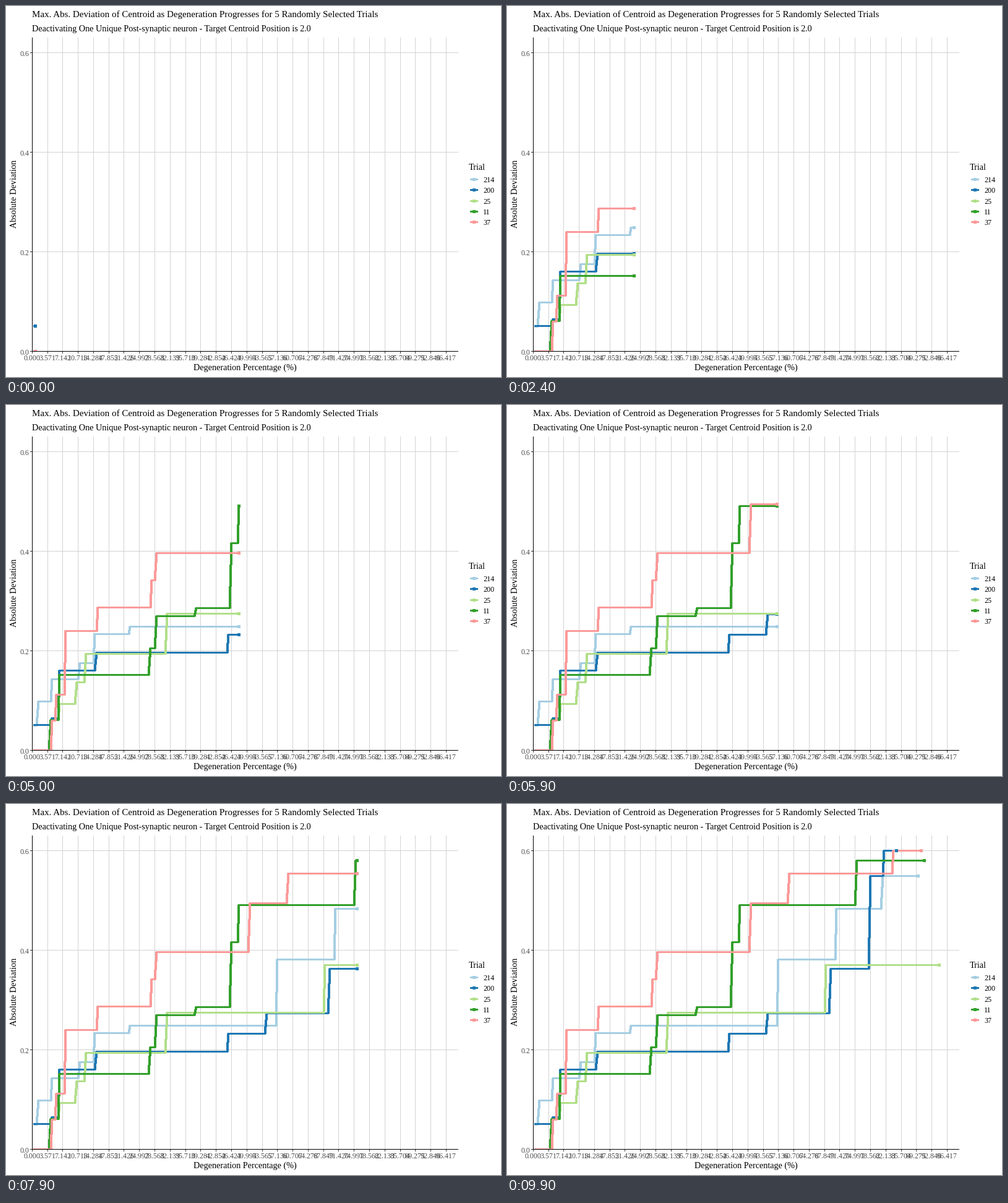
Animation of 800 by 600 pixels, one loop 10000 ms. Source, as a matplotlib script:

```python
import numpy as np
import matplotlib.pyplot as plt
from matplotlib.animation import FuncAnimation
from matplotlib.patches import Circle, Rectangle

W, H, DPI = 800, 600, 100
PX = 72 / DPI
FRAMES, INTERVAL = 100, 100
LEFT, RIGHT, TOP, BOTTOM = 42, 731, 51, 559

# trial: (last step, key points as (step reached, deviation))
TRIALS = {
    "214": (251, [(1, .050), (4, .098), (13, .143), (31, .175), (41, .233),
                  (64, .248), (160, .381), (198, .483), (228, .549)]),
    "200": (237, [(1, .051), (13, .064), (18, .160), (42, .196), (128, .232),
                  (153, .273), (194, .363), (220, .549), (229, .600)]),
    "25": (265, [(1, 0), (13, .061), (18, .093), (29, .137), (35, .194),
                 (88, .274), (191, .370)]),
    "11": (255, [(1, 0), (12, .061), (18, .151), (77, .205), (81, .270),
                 (107, .286), (130, .416), (135, .491), (211, .580)]),
    "37": (253, [(1, 0), (13, .060), (16, .112), (22, .240), (43, .287),
                 (78, .342), (81, .396), (142, .494), (167, .554),
                 (235, .600)]),
}

plt.rcParams["font.family"] = "Liberation Serif"
fig = plt.figure(figsize=(W / DPI, H / DPI), dpi=DPI, facecolor="white")
ax = fig.add_axes([0, 0, 1, 1])
ax.set(xlim=(0, W), ylim=(H, 0))
ax.axis("off")


def pixel(v):
    """Centre of the nearest whole pixel."""
    return np.round(v) + 0.5


def x_of(step):
    return 41.8 + 2.478 * step


def y_of(value):
    return 558 - 805 * value


def label(x, y, s, size, color="black", ha="left", **kw):
    ax.text(x, y, s, size=size * PX, color=color, ha=ha, va="baseline", **kw)


def stroke(xs, ys, color, width, z):
    return ax.plot(xs, ys, color=color, lw=width * PX, zorder=z, snap=False,
                   antialiased=False, solid_capstyle="butt",
                   solid_joinstyle="round")[0]


def dot(x, y, color, z):
    return ax.add_patch(Circle((x, y), 2.5, color=color, lw=0, zorder=z,
                               antialiased=False))


def staircase(last, points):
    steps, values = np.array(points).T
    s = np.arange(1, last + 1)
    v = values[np.searchsorted(steps, s, side="right") - 1]
    return pixel(x_of(s)), pixel(y_of(v))


# grid, axes and tick labels
for k in range(28):
    x = x_of(10 * k)
    line_x = [pixel(x)] * 2
    stroke(line_x, [TOP, BOTTOM], "lightgrey", 1, 1)
    stroke(line_x, [BOTTOM, BOTTOM + 3], "#333333", 1, 6)
    label(x, 573, f"{3.571 * k:.3f}", 12, "#4D4D4D", "center")
for k in range(4):
    y = pixel(y_of(0.2 * k))
    stroke([LEFT, RIGHT], [y, y], "lightgrey", 1, 1)
    stroke([LEFT - 3, LEFT], [y, y], "#333333", 1, 6)
    label(37, y + 5.5, f"{0.2 * k:.1f}", 12, "#4D4D4D", "right")
stroke([LEFT + 0.5] * 2, [TOP, BOTTOM], "black", 1, 7)
stroke([LEFT, RIGHT], [BOTTOM - 0.5] * 2, "black", 1, 7)

# titles
label(42, 18, "Max. Abs. Deviation of Centroid as Degeneration Progresses "
      "for 5 Randomly Selected Trials", 15.07)
label(42, 41, "Deactivating One Unique Post-synaptic neuron - "
      "Target Centroid Position is 2.0", 14.1)
label(386, 589, "Degeneration Percentage (%)", 14.1, ha="center")
label(17, 304, "Absolute Deviation", 14.1, ha="center", rotation=90,
      rotation_mode="anchor")
label(748, 265, "Trial", 14.1)

# curves and legend
panel = Rectangle((LEFT, TOP), RIGHT - LEFT, BOTTOM - TOP,
                  transform=ax.transData)
curves = []
for i, (name, (last, points)) in enumerate(TRIALS.items()):
    color = plt.cm.Paired(i)
    key_y = pixel(280.1 + 17.28 * i)
    stroke([750, 763], [key_y, key_y], color, 3, 3)
    dot(756.5, key_y, color, 4)
    label(771, key_y + 4.5, name, 12)

    xs, ys = staircase(last, points)
    line = stroke([], [], color, 3, 3 + i / 10)
    head = dot(xs[0], ys[0], color, 4 + i / 10)
    line.set_clip_path(panel)
    head.set_clip_path(panel)
    curves.append((line, head, xs, ys))


def update(frame):
    shown = int(np.ceil((4 + 8 * frame) / 3))
    for line, head, xs, ys in curves:
        n = min(shown, len(xs))
        line.set_data(xs[:n], ys[:n])
        head.center = xs[n - 1], ys[n - 1]
    return [artist for c in curves for artist in c[:2]]


anim = FuncAnimation(fig, update, frames=FRAMES, interval=INTERVAL,
                     repeat=True, repeat_delay=0, blit=False)
plt.show()
```
